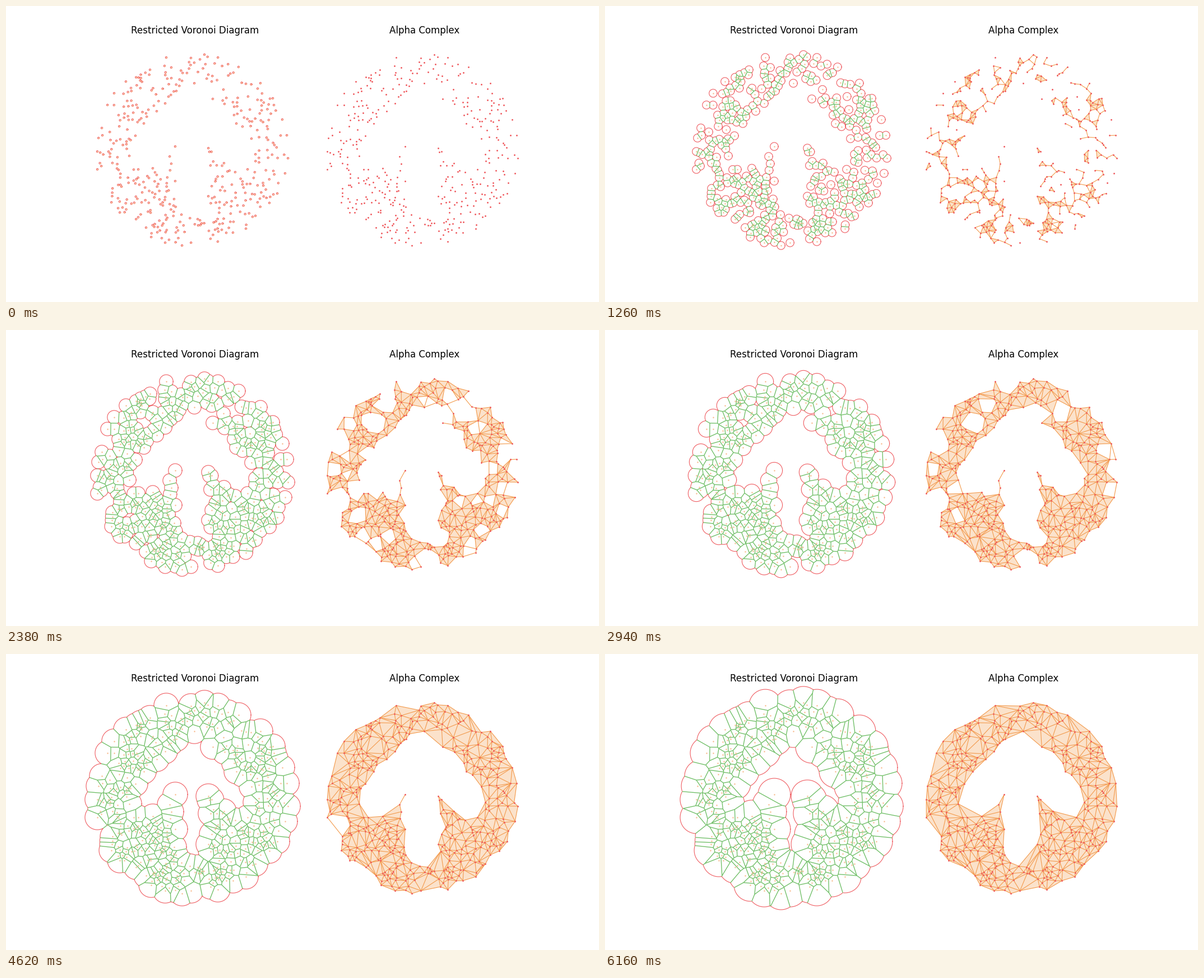
A matplotlib script that plays this animation: 1058 by 529 pixels, repeating every 6300 ms.

```python
import numpy as np
import matplotlib.pyplot as plt
from matplotlib.animation import FuncAnimation
from matplotlib.collections import LineCollection, PolyCollection
from matplotlib.path import Path
from matplotlib.tri import Triangulation

WIDTH, HEIGHT, DPI = 1058, 529, 128
PX = 72 / DPI                      # points per pixel
FRAMES, INTERVAL = 45, 140
COUNT, MIN_GAP = 412, 3.6
SHIFT = np.array([410.3, 0])       # left panel to right panel
RED, GREEN, ORANGE = "#ef5b60", "#6cbd63", "#f3994a"
PALE_ORANGE, FILL = "#f9bd90", "#fbe2cb"

OUTER = [
    (286, 92), (295, 110), (330, 93), (354, 87), (378, 92), (415, 109),
    (454, 138), (476, 165), (478, 177), (493, 203), (501, 231), (503, 272),
    (498, 299), (484, 335), (470, 352), (445, 375), (428, 398), (405, 405),
    (378, 421), (365, 416), (362, 402), (343, 392), (330, 423), (314, 428),
    (284, 423), (259, 413), (250, 396), (232, 381), (203, 369), (188, 351),
    (190, 326), (201, 293), (163, 292), (163, 260), (165, 236), (171, 218),
    (202, 215), (201, 195), (181, 177), (193, 156), (214, 135), (257, 114),
    (283, 107)]
HOLE = [
    (336, 138), (367, 135), (369, 166), (390, 175), (407, 195), (411, 210),
    (438, 237), (445, 265), (431, 292), (409, 297), (389, 281), (361, 254),
    (365, 285), (367, 322), (361, 340), (342, 381), (313, 373), (300, 345),
    (302, 313), (295, 282), (302, 251), (292, 269), (262, 290), (236, 292),
    (220, 268), (215, 247), (231, 232), (246, 210), (269, 188), (284, 174),
    (304, 152)]


def scatter_points():
    """Outline points plus random ones in between, denser towards the bottom."""
    rng = np.random.default_rng(12)
    outer, hole = Path(OUTER), Path(HOLE)
    outline = np.array(OUTER + HOLE, float)
    points = list(outline + rng.uniform(-0.1, 0.1, outline.shape))
    while len(points) < COUNT:
        p = rng.uniform((160, 85), (506, 430))
        density = 0.6 + 0.4 * np.clip((p[1] - 130) / 120, 0, 1)
        if rng.random() > density:
            continue
        if not outer.contains_point(p) or hole.contains_point(p):
            continue
        if np.hypot(*(np.array(points) - p).T).min() > MIN_GAP:
            points.append(p)
    return np.array(points)


def circumcentres(corners):
    a = corners[:, 0]
    b, c = corners[:, 1] - a, corners[:, 2] - a
    bb, cc = (b ** 2).sum(1), (c ** 2).sum(1)
    area = 2 * (b[:, 0] * c[:, 1] - b[:, 1] * c[:, 0])
    offset = np.column_stack([c[:, 1] * bb - b[:, 1] * cc,
                              b[:, 0] * cc - c[:, 0] * bb]) / area[:, None]
    return a + offset, np.hypot(*offset.T)


points = scatter_points()
mesh = Triangulation(*points.T)
triangles, edges = mesh.triangles, mesh.edges
centres, triangle_birth = circumcentres(points[triangles])

# Each Voronoi edge runs along the bisector mid + t * normal, low <= t <= high.
start, end = points[edges[:, 0]], points[edges[:, 1]]
mid = (start + end) / 2
length = np.hypot(*(end - start).T)
normal = (end - start)[:, ::-1] * (-1, 1) / length[:, None]
sides = {}
for t, tri in enumerate(triangles):
    for i in range(3):
        pair = frozenset((int(tri[i]), int(tri[i - 1])))
        sides.setdefault(pair, []).append((t, tri[i - 2]))
low, high = np.empty(len(edges)), np.empty(len(edges))
for e, (i, j) in enumerate(edges):
    touching = sides[frozenset((int(i), int(j)))]
    ends = [(centres[t] - mid[e]) @ normal[e] for t, _ in touching]
    if len(ends) == 1:
        apex = points[touching[0][1]]
        ends.append(-1e4 * np.sign((apex - mid[e]) @ normal[e]))
    low[e], high[e] = min(ends), max(ends)
edge_birth = np.hypot(length / 2, np.clip(0, low, high))

# A circle point is hidden when a neighbouring disc covers it.
angles = np.linspace(0, 2 * np.pi, 181)
unit = np.column_stack([np.cos(angles), np.sin(angles)])
links = np.vstack([edges, edges[:, ::-1]])
links = links[np.argsort(links[:, 0], kind="stable")]
first_link = np.searchsorted(links[:, 0], np.arange(COUNT))
link_vec = points[links[:, 1]] - points[links[:, 0]]
link_len = np.hypot(*link_vec.T)[:, None]
facing = (link_vec / link_len) @ unit.T


def union_outline(r):
    hidden = np.logical_or.reduceat(facing > link_len / (2 * r), first_link)
    rings = points[:, None] + r * unit
    rings[hidden] = np.nan
    gap = np.full((COUNT, 1, 2), np.nan)
    return np.concatenate([rings, gap], axis=1).reshape(-1, 2)


def voronoi_segments(r):
    reach = np.sqrt(np.maximum(r * r - length ** 2 / 4, 0))
    a, b = np.maximum(low, -reach), np.minimum(high, reach)
    on = (edge_birth < r) & (a < b)
    return np.stack([mid + a[:, None] * normal,
                     mid + b[:, None] * normal], axis=1)[on]


fig = plt.figure(figsize=(WIDTH / DPI, HEIGHT / DPI), dpi=DPI,
                 facecolor="white")
ax = fig.add_axes([0, 0, 1, 1])
ax.set(xlim=(0, WIDTH), ylim=(HEIGHT, 0))
ax.axis("off")
for x, title in ((337, "Restricted Voronoi Diagram"), (747, "Alpha Complex")):
    ax.text(x, 48.7, title, ha="center", va="baseline", color="black",
            fontsize=16.67 * PX, family="DejaVu Sans")


def dots(xy, size, color):
    ax.plot(*xy.T, "o", ms=size * PX, mew=0, color=color, zorder=4)


dots(points, 2.5, PALE_ORANGE)
dots(points + SHIFT, 2.9, RED)
outline, = ax.plot([], [], color=RED, lw=1.1 * PX, zorder=2)
cells = LineCollection([], colors=GREEN, linewidths=1.3 * PX, zorder=3)
faces = PolyCollection([], facecolors=FILL, edgecolors="none", zorder=1)
bonds = LineCollection([], colors=ORANGE, linewidths=1.1 * PX, zorder=2)
for collection in (cells, faces, bonds):
    ax.add_collection(collection, autolim=False)


def update(frame):
    r = 1.6 + 0.622 * frame
    outline.set_data(*union_outline(r).T)
    cells.set_segments(voronoi_segments(r))
    faces.set_verts(points[triangles[triangle_birth <= r]] + SHIFT)
    bonds.set_segments(points[edges[edge_birth <= r]] + SHIFT)
    return outline, cells, faces, bonds


anim = FuncAnimation(fig, update, frames=FRAMES, interval=INTERVAL,
                     repeat=True, repeat_delay=0)
plt.show()
```
